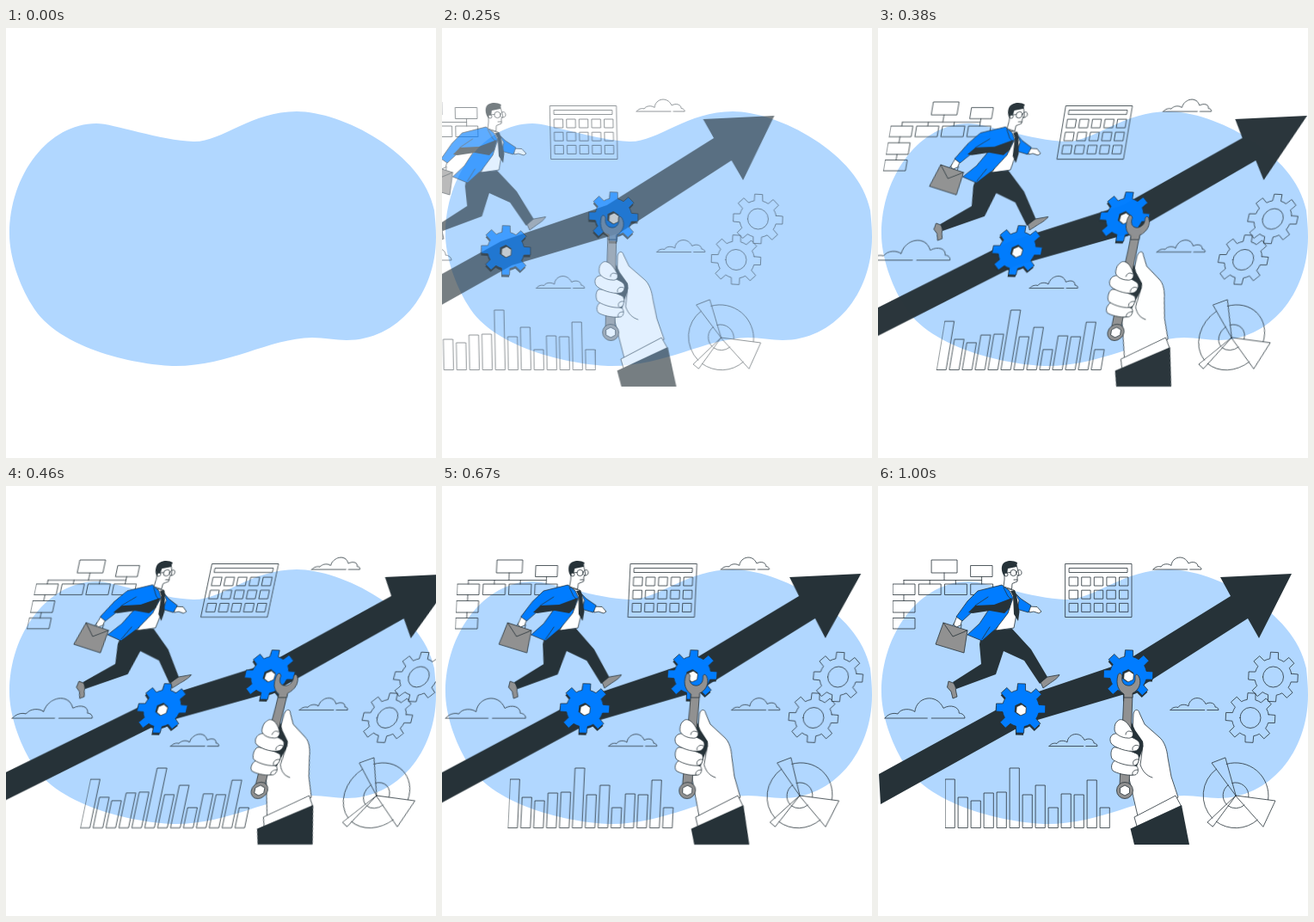
These frames come from a looping animation (500 px wide and 500 px high, 1040 ms). An HTML page:

```html
<!DOCTYPE html>
<html lang="en">
<head>
<meta charset="utf-8">
<title>Growth arrow</title>
<style>
  html, body { margin: 0; width: 100%; height: 100%; overflow: hidden; background: #fff; }
  svg { display: block; width: 100vw; height: 100vh; }
  .line { fill: none; stroke: #263238; stroke-width: .8; stroke-linejoin: round; stroke-linecap: round; }
  .ink { fill: #263238; }
  .blue { fill: #007cff; }
  .skin { fill: #fff; }
  .grey { fill: #919191; }
  .blue, .skin, .grey { stroke: #263238; stroke-width: .8; stroke-linejoin: round; }
  .part {
    transform-box: fill-box;
    transform-origin: center;
    animation: rush 1040ms infinite;
  }
  /* fly in from the left, lean past upright, settle */
  @keyframes rush {
    0% {
      transform: matrix(1, 0, .363, 1, -249.6, 0);
      opacity: .001;
      animation-timing-function: cubic-bezier(.35, .057, .499, 1.371);
    }
    56.15% {
      transform: matrix(1, 0, -.1763, 1, 0, 0);
      opacity: 1;
      animation-timing-function: cubic-bezier(.36, -.01, .5, 1.38);
    }
    75.38% {
      transform: matrix(1, 0, .0349, 1, 0, 0);
      opacity: 1;
      animation-timing-function: cubic-bezier(.36, -.01, .5, 1.38);
    }
    94.62%, 100% { transform: matrix(1, 0, 0, 1, 0, 0); opacity: 1; }
  }
</style>
</head>
<body>
<svg viewBox="0 0 500 500">
  <path fill="#b1d7ff" d="M105 111C125 111 180 131 218 132C250 133 285 97 338 97C390 97 485 145 498 212C499 222 500 232 500 243C500 310 455 363 396 363C383 363 370 360 356 360C305 361 260 393 197 393C160 393 60 375 30 322C15 298 4 265 4 240C4 170 50 111 105 111Z"/>

  <path class="part line" id="clouds"/>
  <path class="part line" id="bars"/>
  <path class="part line" id="pie"/>
  <path class="part line" id="cogs"/>
  <path class="part line" id="calendar"/>
  <path class="part line" id="tree"/>

  <path class="part ink" d="M1 335L160 248L284 206L410 128L398 106L481 102L443 177L430 154L297 239L172 276L3 370Z"/>
  <g class="part" id="gear1"></g>
  <g class="part" id="gear2"></g>

  <g class="part" id="runner">
    <path class="grey" d="M189 228L197 222L211 219.500C209 224 203 227 199 230L192 235Z"/>
    <path class="grey" d="M82 227L90 230L90.500 238L92 245L87 247L85 239L80.500 234Z"/>
    <path class="ink" d="M121 168L118 184L120 207L87 228L91 236L137 219L146 192L170 203L188 230L197 222L178 190L156 166Z"/>
    <path class="skin" d="M175 140L185 140.500L190 146L187 148L181 146L176 147Z"/>
    <path class="blue" d="M158 123L166 131L178 139L175 147L161 143Z"/>
    <path class="skin" d="M147 119L158 121L164 133L158 165L137 168L150 140Z"/>
    <path class="ink" d="M154 122L159 121L161 127L164.500 146L163 157L158 149L157 128Z"/>
    <path class="grey" d="M76 159L104 168L100 194L67 184Z"/>
    <path class="line" d="M76 159L87 175L104 168M87 162L89 158.500L97 161L96.500 165"/>
    <path class="skin" d="M92 151L98 155L96 162L91 164L88 161Z"/>
    <path class="blue" d="M116 122L144 115L153 122L157 130L151 148L138 165L121 180L104 173L118 160L130 142L112 144L98 157L91 152L104 134Z"/>
    <path class="ink" d="M105 147L113 139L135 138L156 130L153 142L147 148L130 145L110 148Z"/>
    <path class="line" d="M146 118L151 128L156 133M121 178L130 164M113 139L128 129"/>
    <path class="skin" d="M147 95L161 92L162.500 97L164 103.500L162 105L162 111L156 113.500L155.500 120L146 117L147 109Z"/>
    <path class="ink" d="M144.500 92C147 86 157 86 162 89L161 94L151 96L150 103L147 105C144 101 143 96 144.500 92Z"/>
    <circle class="skin" cx="149" cy="103" r="2"/>
    <g class="line"><circle cx="157.500" cy="101" r="3.600"/><path d="M161 100.500C163 96 167 97 167 101C167 104 163 105 161.500 103M149 101L154 100.500M158 109L162 109"/></g>
  </g>

  <g class="part" id="hand">
    <path class="skin" d="M297 265C298 259 303 259 304 264L310 277L327 292C333 297 336 306 337 316L341 338L349 362L303 388L297 362L291 336L296 285Z"/>
    <path class="ink" d="M294 273L299 284L308 297C310 304 305 312 303 320L298 336L289 337L290 290Z"/>
    <path class="line" d="M308 302L305 324C308 333 313 337 319 339"/>
    <path class="grey" d="M286 242L296 242L292 348L281 348Z"/>
    <path class="grey" d="M279 220C276 231 280 238 286 242L286 246L296 246L296 241C304 237 307 228 303 221C301 218 299 219 299 222C300 229 295 233 290 232C284 231 283 225 284 221C283 217 280 217 279 220Z"/>
    <circle class="grey" cx="287" cy="354" r="9.500"/>
    <path class="skin" d="M287 348L292.500 351L292.500 357L287 360L281.500 357L281.500 351Z"/>
    <g class="skin">
      <path d="M276 319C281 320 296 324 301 326C304 330 302 337 297 336C289 337 277 334 273 331C270 327 272 321 276 319Z"/>
      <path d="M274 304C279 303 297 309 302 312C305 316 303 325 298 325C290 326 275 321 272 317C270 312 271 306 274 304Z"/>
      <path d="M273 289C278 285 298 292 303 297C306 301 303 308 299 308C291 310 274 304 271 299C269 295 270 291 273 289Z"/>
      <path d="M279 273C283 269 291 274 296 286C298 291 294 294 290 293C284 293 275 289 275 283C275 278 276 275 279 273Z"/>
    </g>
    <path class="line" d="M288 289C288 285 292 284 295 286M296 307C295 303 299 300 303 302M297 324C295 320 299 317 303 318M296 336C295 332 298 330 302 330"/>
    <path class="skin" d="M298 385L346 360L353 373L302 399Z"/>
    <path class="ink" d="M293.500 398.500L353 371L362 417L298 417Z"/>
  </g>
</svg>
<script>
  const $ = id => document.getElementById(id);
  const draw = (id, d) => $(id).setAttribute('d', d);
  const at = (x, y, r, deg) => {
    const a = deg * Math.PI / 180;
    return (x + r * Math.cos(a)).toFixed(2) + ' ' + (y + r * Math.sin(a)).toFixed(2);
  };
  const box = (x, y, w, h) => `M${x} ${y}h${w}v${h}h${-w}Z`;
  const ring = (x, y, r) => `M${x - r} ${y}a${r} ${r} 0 1 1 ${2 * r} 0a${r} ${r} 0 1 1 ${-2 * r} 0Z`;
  const arc = (x, y, r, from, to) =>
    `M${at(x, y, r, from)}A${r} ${r} 0 ${to - from > 180 ? 1 : 0} 1 ${at(x, y, r, to)}`;

  // eight-toothed wheel
  function wheel(x, y, tilt) {
    let d = '';
    for (let i = 0; i < 8; i++) {
      const a = i * 45 + tilt;
      d += (i ? 'A21.500 21.500 0 0 1 ' : 'M') + at(x, y, 21.5, a - 13) +
        'L' + at(x, y, 29, a - 9) + 'L' + at(x, y, 29, a + 9) + 'L' + at(x, y, 21.5, a + 13);
    }
    return d + `A21.500 21.500 0 0 1 ${at(x, y, 21.5, tilt - 13)}Z`;
  }
  const hex = (x, y, r) => 'M' + [0, 1, 2, 3, 4, 5].map(i => at(x, y, r, i * 60 - 25)).join('L') + 'Z';

  function gear(id, x, y) {
    const face = wheel(x, y, 2);
    $(id).innerHTML =
      `<path class="ink" d="${face}" transform="translate(-.5 2.500)"/>` +
      `<path class="blue" d="${face}"/>` +
      `<path class="ink" d="${hex(x - .5, y + 1, 7.5)}"/>` +
      `<path class="skin" d="${hex(x + .5, y + 2, 6.5)}"/>`;
  }
  gear('gear1', 166, 258.5);
  gear('gear2', 291, 219.5);

  draw('cogs', [[459.5, 222], [433, 269.5]].map(([x, y]) => wheel(x, y, 3) + ring(x, y, 12)).join(''));

  // base line has a short gap, given as a share of the width
  function cloud(x, y, s, gap) {
    const p = (...v) => v.map((n, i) => (i % 2 ? y : x) + n * s).join(' ');
    return `M${p(0, 0)}C${p(2, -3, 6, -4, 9, -3)}C${p(11, -7, 18, -7, 21, -4.5)}` +
      `C${p(22, -15, 36, -18, 41, -7)}C${p(46, -10, 52, -8, 52, -3.5)}C${p(54, -3.5, 56, -2, 56, 0)}` +
      `L${p(gap * 56 + 3, 0)}M${p(gap * 56, 0)}L${p(0, 0)}`;
  }
  draw('clouds', cloud(320, 97, 1, .71) + cloud(340, 260.5, 1, .71) +
    cloud(199, 302.5, 1, .71) + cloud(8, 270, 1.66, .53));

  const tops = [341, 362, 366, 357, 356, 328, 359, 348, 374, 358, 359, 342, 374];
  draw('bars', tops.map((y, i) => box(78.5 + i * 15, y, 10.8, 397.5 - y)).join(''));

  let days = box(218, 90.5, 77, 62) + box(222.5, 95.5, 67.5, 5);
  for (let i = 0; i < 15; i++)
    days += box(222.5 + i % 5 * 14.6, 106 + Math.floor(i / 5) * 15.2, 10, 10);
  draw('calendar', days);

  draw('tree', box(62.5, 86, 29.5, 15) + box(108, 92.5, 25, 13) +
    [0, 1, 2, 3].map(i => box(17.5 + i * 30.2, 114, 25.5, 12.5) + `M${30 + i * 30.2} 109.500V114`).join('') +
    box(17.5, 133.5, 25.5, 13.5) + box(17.5, 153.5, 25.5, 12.5) +
    'M30 109.500H120.600V105.500M77 101V109.500M30 126.500V133.500M30 147V153.500');

  const arcs = [[253.5, 367.4], [48.4, 126.9], [135.9, 233.6]];
  draw('pie', arcs.map(([a, b]) => arc(416, 359.8, 38, a, b) + arc(416, 359.8, 15, a, b)).join('') +
    'M416 360L388 322L403.500 316ZM416 360L462 366L448 396ZM416 360L383 391L389 396Z');
</script>
</body>
</html>
```
